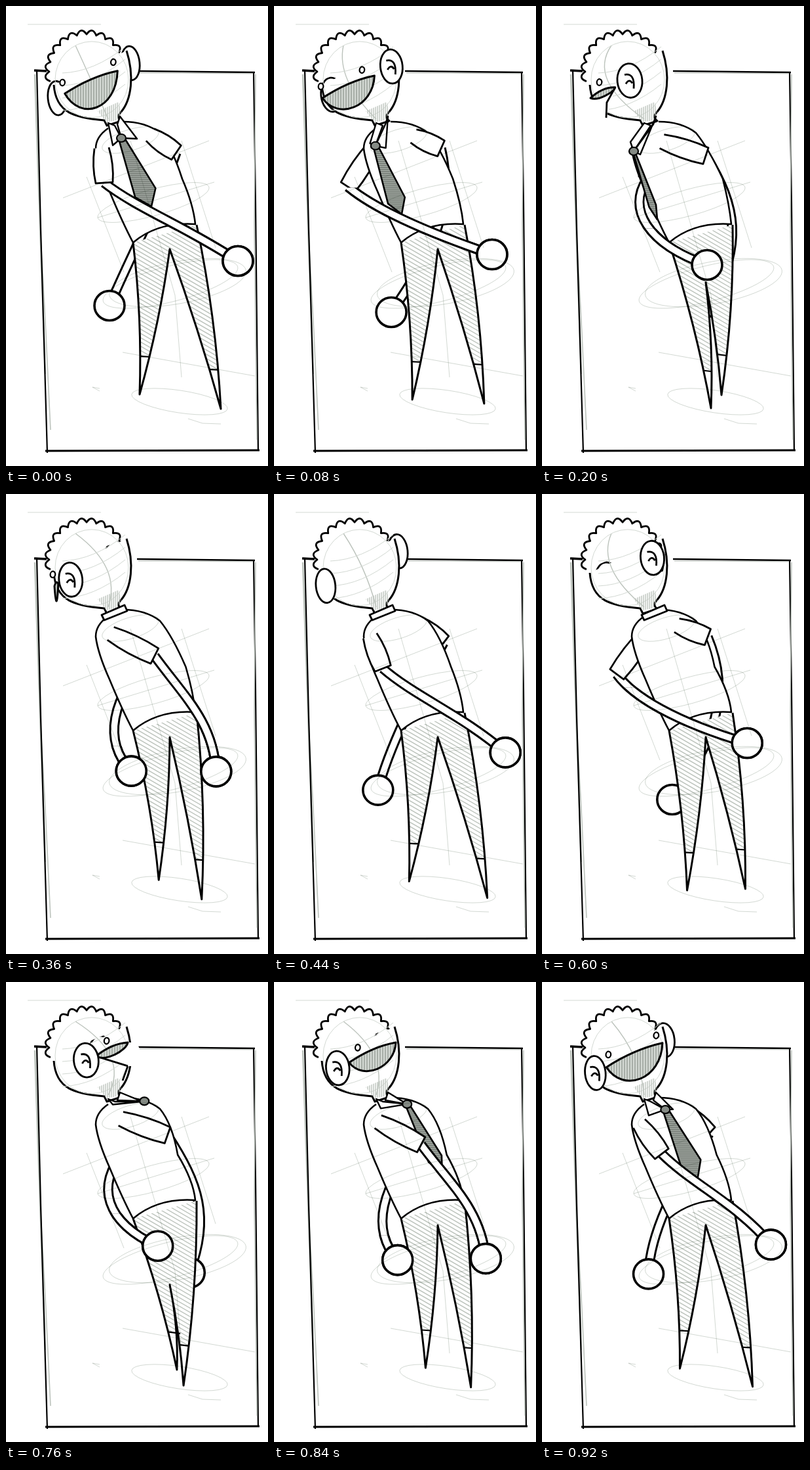
Write an HTML page with a canvas that moves like this. It is 400 px wide and 700 px high and loops after 1020 ms.

```html
<!DOCTYPE html>
<html lang="en">
<head>
<meta charset="utf-8">
<title>Turning sketch</title>
<style>
html, body { margin: 0; width: 100%; height: 100%; overflow: hidden; background: #fff; }
canvas { display: block; width: 400px; height: 700px; }
</style>
</head>
<body>
<canvas id="c" width="400" height="700"></canvas>
<script>
const g = document.getElementById('c').getContext('2d');
const INK = '#000', PALE = '#d3d9d3', MID = '#bcc3bc';
const LOOP = 1020, STEP = 40, COUNT = 24;
const { PI, sin, cos, abs, min, max } = Math;
const rad = d => d * PI / 180;
const mix = (a, b, t) => a + (b - a) * t;

// Body turn in degrees at a few drawings
const TURN = [[0, 0], [5, 90], [9, 129], [11, 170], [15, 232], [19, 282], [23, 340], [24, 360]];
function turnAt(i) {
  const k = TURN.findIndex(p => p[0] > i);
  const [i0, a0] = TURN[k - 1], [i1, a1] = TURN[k];
  return mix(a0, a1, (i - i0) / (i1 - i0));
}

const shape = d => new Path2D(d);
const poly = (...p) => shape('M' + p.join(' '));
const area = (...p) => shape('M' + p.join(' ') + 'Z');
function oval(x, y, rx, ry, tilt = 0) {
  const p = new Path2D();
  p.ellipse(x, y, rx, ry, tilt, 0, PI * 2);
  return p;
}
function ink(p, w = 2.8, color = INK) {
  g.lineWidth = w;
  g.strokeStyle = color;
  g.stroke(p);
}
function fill(p, color = '#fff') {
  g.fillStyle = color;
  g.fill(p);
}
function paint(p, w, color) {
  fill(p, color);
  ink(p, w);
}
function inside(p, draw) {
  g.save();
  g.clip(p);
  draw();
  g.restore();
}
// parallel lines: first line from (x, y) by (w, h), repeated n times at (dx, dy)
function hatch(x, y, w, h, dx, dy, n, weight, color) {
  for (let k = 0; k < n; k++)
    ink(poly(x + k * dx, y + k * dy, x + k * dx + w, y + k * dy + h), weight, color);
}

function border() {
  ink(poly(43, 98, 62, 99), 3.5);
  ink(poly(200, 99, 380, 101), 2.4);
  ink(poly(202, 102, 376, 103), 1.2, MID);
  ink(poly(378, 100, 381, 300, 385, 677), 2.2);
  ink(poly(381, 104, 379, 330, 383, 660), 1.5, MID);
  ink(poly(387, 676, 60, 677), 2.8);
  ink(poly(44, 104, 51, 310, 60, 560), 2.5, MID);
  ink(poly(52, 330, 60, 480, 68, 645), 1.6, MID);
  ink(poly(47, 97, 53, 340, 63, 680), 2.2);
  ink(poly(33, 28, 145, 28), 1, PALE);
}

function guides() {
  const lines = [
    poly(87, 292, 310, 205), poly(178, 527, 380, 563), poly(123, 260, 180, 405),
    poly(268, 205, 320, 368), poly(190, 205, 258, 440, 268, 565), poly(140, 322, 318, 268),
    poly(143, 582, 132, 580, 143, 586), poly(278, 628, 300, 635, 328, 636),
    oval(190, 204, 45, 16, -.3), oval(225, 299, 88, 20, -.27),
    oval(251, 423, 106, 27, -.25), oval(262, 421, 106, 32, -.18), oval(265, 602, 74, 17, .15)];
  g.save();
  g.globalCompositeOperation = 'multiply';
  lines.forEach(p => ink(p, 1, PALE));
  g.restore();
}

// Both arms follow one rule, half a turn apart
function makeArm(deg) {
  const f = (deg + 360) % 360, c = cos(rad(f)), s = sin(rad(f));
  return {
    shoulder: [183 - 37 * c, 206 + 10 * c],
    cuff: [205 - 55 * c - 45 * s - 44 * s * c, 246 + 23 * c + 18 * s],
    elbow: [215 - 15 * c - 85 * s, 308],
    wrist: [232 + 45 * c - 72 * s, 362 - 25 * c],
    hand: [256 + 98 * c - 4 * s, 422 - 34 * c - 28 * s],
    near: s < .05,
    // height below which the arm passes in front of the body
    frontFrom: f > 295 || f < 10 ? 0 : f < 140 ? 235 + 1.15 * f : 700
  };
}
function drawArm(a) {
  const p = shape(`M${a.cuff} C${a.elbow} ${a.wrist} ${a.hand}`);
  ink(p, 15.5);
  ink(p, 9.5, '#fff');
  paint(oval(...a.hand, 23, 22.5), 3.6);
}
function drawFrontArm(a) {
  const p = new Path2D();
  p.rect(0, a.frontFrom, 400, 700);
  inside(p, () => drawArm(a));
}
function drawSleeve({ shoulder: [x, y], cuff: [u, v] }) {
  const len = Math.hypot(u - x, v - y);
  const nx = (y - v) / len, ny = (u - x) / len;
  const at = (t, w) => [mix(x, u, t) + nx * w, mix(y, v, t) + ny * w];
  paint(shape(`M${at(0, 11)} Q${at(.5, 17)} ${at(1, 13)} L${at(1, -13)} Q${at(.5, -17)} ${at(0, -11)}`));
}

function drawLegs(c, s) {
  const reach = 62 * c + 8 * s, lift = 11 * c - 10 * s;
  const sign = reach < 0 ? -1 : 1, gap = abs(reach) * 2;
  const lx = 266 - gap / 2, rx = 266 + gap / 2;
  const ly = 602 - lift * sign, ry = 602 + lift * sign;
  const hx = 291, hy = 333, cx = 250, cy = 370 + 250 * Math.exp(-gap / 10);
  const bend = (x0, y0, x1, y1, d) => `${(x0 + x1) / 2 + d} ${(y0 + y1) / 2} `;
  const p = shape(`M194 360 Q${bend(194, 360, lx, ly, 9)} ${lx} ${ly}
    Q${bend(lx, ly, cx, cy, 8)} ${cx} ${cy} Q${bend(cx, cy, rx, ry, 5)} ${rx} ${ry}
    Q${bend(rx, ry, hx, hy, 11)} ${hx} ${hy}`);
  fill(p);
  inside(p, () => {
    const al = ly - 58, ar = ry - 60, m = (lx + rx) / 2;
    inside(area(180, 325, 345, 325, 345, ar + 2, m, ar, m, al, 180, al), () =>
      hatch(185, 220, 160, 92, 0, 6.5, 54, 1.4, MID));
    ink(poly(lx - 25, al - 1, m, al + 3), 2.2);
    ink(poly(m, ar - 2, rx + 25, ar + 2), 2.2);
  });
  ink(p, 3);
}

function drawTorso(s) {
  paint(shape(`M156 186 Q137 199 137 217 Q140 242 158 282 Q178 330 194 360
    Q232 328 289 332 Q286 302 ${269 + 7 * s} 263 Q254 216 235 193 Q213 176 178 176`), 2.6);
}

function drawCollar(c, s) {
  if (c < -.2) {
    const d = s < 0 ? 6 : 0;
    paint(area(146 + d, 184, 150 + d, 192, 185 + d, 178, 181 + d, 169));
    return;
  }
  const left = max(0, s), right = max(0, -s);
  const kx = 176 - 36 * s, ky = 201 + 20 * s;
  if (s > -.8) drawTie(kx, ky, 222 - 46 * s, 305 + 20 * s, max(11, 34 * c));
  paint(area(156, 178, 163 - 28 * left, 212 - 5 * left - 26 * right, kx, ky, 166, 182), 2.4);
  paint(area(174, 168, 200 - 50 * left, 202 + 24 * s, kx, ky, 170, 180), 2.4);
  paint(oval(kx, ky, 7, 6), 2.2, '#858b85');
}
function drawTie(kx, ky, ex, ey, w) {
  const len = Math.hypot(ex - kx, ey - ky);
  const nx = (ky - ey) / len * w / 2, ny = (ex - kx) / len * w / 2;
  const at = (t, k) => [mix(kx, ex, t) + nx * k, mix(ky, ey, t) + ny * k];
  const p = area(at(0, .25), at(.8, 1), ex, ey, at(.8, -1), at(0, -.25));
  fill(p, '#a3aaa3');
  inside(p, () => hatch(120, ky, 150, 0, 0, 3, 44, 1, '#5e635e'));
  ink(p, 2.6);
}

function drawEar(x, s, detail) {
  const y = 143 - (x - 72) * .475;
  paint(oval(x, y, 14 + 5 * abs(s), 26, -.1));
  if (!detail) return;
  ink(shape(`M${x - 8} ${y - 9} q16 -3 14 21 M${x - 6} ${y + 5} q5 -9 10 -1`));
}

function drawHead(mid) {
  paint(shape(`M73 120 C76 163 105 170 150 174 L154 182 L176 175 Q168 169 175 162
    C192 143 196 105 184 68`), 3);
  const from = 2.88, step = (5.76 - from) / 11;
  const pt = (a, r) => [123 + cos(a) * r, 100 + sin(a) * r];
  let d = `M${pt(from, 57)}`;
  for (let a = from, k = 0; k < 11; k++, a += step)
    d += `Q${pt(a + step / 2, 70)} ${pt(a + step, 57)}`;
  paint(shape(d), 2.8);
  // soft shading
  ink(shape(`M106 60 Q${mid} 112 156 172`), 1.4, MID);
  ink(oval(131, 112, 56, 58), 1, PALE);
  for (let y = 90; y < 160; y += 19) ink(shape(`M86 ${y + 12} Q135 ${y + 10} 182 ${y - 28}`), 1, PALE);
  inside(area(140, 160, 172, 146, 176, 162, 169, 174, 153, 177), () =>
    hatch(140, 140, 0, 40, 3, 0, 14, 1.4, MID));
}

function drawFace(deg, c, s) {
  const a = deg > 180 ? deg - 360 : deg;
  const onHead = t => 130 - 56 * sin(rad(max(-90, min(90, t))));
  const level = x => 116 - (x - 130) * .43;
  const spread = 46 + 25 * abs(s);
  const lx = onHead(a + spread), rx = onHead(a - spread), ly = level(lx), ry = level(rx);
  const profile = abs(s) > .85 && c > -.5;
  if (profile) {
    const left = s > 0;
    const [ix, iy, tx, ty] = left ? [rx, ry, lx, ly] : [lx, ly, rx, ry];
    const [jx, jy, out] = left ? [tx + 24, ty + 30, -14] : [tx, ty + 36, 14];
    fill(area(ix, iy, tx, ty, tx + out, ty, jx + out * 2, jy, jx, jy));
    ink(poly(ix, iy, (ix + jx) / 2 - (left ? 6 : 0), (iy + jy) / 2, jx, jy));
    if (!left) ink(poly(jx, jy, jx - 8, jy + 22));
  }
  if (rx - lx > 3) {
    const drop = max(.12, abs(c));
    const p = shape(`M${lx} ${ly} Q${(lx + rx) / 2} ${(ly + ry) / 2 - 9} ${rx} ${ry}
      C${rx - 2} ${ry + 60 * drop} ${mix(lx, rx, .3)} ${ly + 42 * drop} ${lx} ${ly}Z`);
    fill(p, '#d4d9d4');
    inside(p, () => hatch(70, 85, 0, 100, 4, 0, 33, 1.6, '#9ca39c'));
    ink(p, 3);
  }
  for (const t of [a + 46, a - 46]) {
    if (cos(rad(t)) < .1) continue;
    const x = 125 - 54 * sin(rad(t));
    paint(oval(x, 101 - (x - 125) * .4, 3.8, 4.8, .15), 2.2);
  }
}

function draw(i) {
  const deg = turnAt(i), c = cos(rad(deg)), s = sin(rad(deg));
  const arms = [makeArm(deg), makeArm(deg + 180)];
  const ears = [{ x: 134 + 56 * c, near: s > .05 }, { x: 134 - 56 * c, near: s < -.05 }];
  g.fillStyle = '#fff';
  g.fillRect(0, 0, 400, 700);
  border();
  arms.forEach(drawArm);
  arms.filter(a => !a.near).forEach(drawSleeve);
  ears.filter(e => !e.near).forEach(e => drawEar(e.x, s));
  drawHead(130 - 60 * s * Math.sign(c));
  drawFace(deg, c, s);
  ears.filter(e => e.near).forEach(e => drawEar(e.x, s, c > -.9));
  drawLegs(c, s);
  drawTorso(s);
  drawCollar(c, s);
  arms.forEach(drawFrontArm);
  arms.filter(a => a.near).forEach(drawSleeve);
  guides();
}

g.lineJoin = 'round';
const start = performance.now();
function tick() {
  const t = (performance.now() - start) % LOOP;
  draw(min(COUNT - 1, Math.floor(t / STEP)));
  requestAnimationFrame(tick);
}
tick();
</script>
</body>
</html>
```
